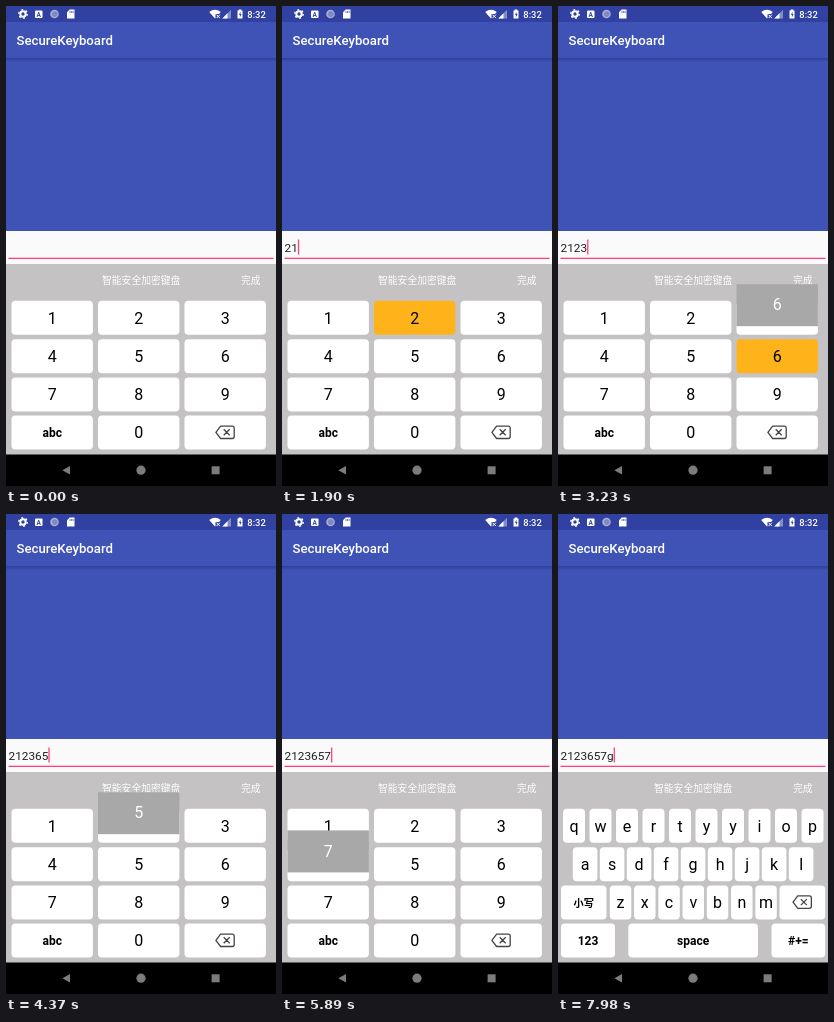
An HTML page that plays this animation: 270 px wide and 480 px high, repeating every 8000 ms.

```html
<!DOCTYPE html>
<html lang="zh">
<head>
<meta charset="utf-8">
<title>SecureKeyboard</title>
<style>
  html, body { margin: 0; width: 100%; height: 100%; overflow: hidden; background: #000; }
  svg { display: block; width: 100%; height: 100%; font-family: Roboto, sans-serif; }
  .key rect { fill: #fff; }
  .key.pressed rect { fill: #ffb31a; }
  .key text { font-size: 16px; text-anchor: middle; fill: #000; }
  .key .bold { font-size: 12px; font-weight: 700; }
  .key .cjk { font-size: 10.2px; }
  .cjk { font-family: "Noto Sans CJK SC", "Noto Sans CJK", sans-serif; }
  .bar { font-size: 9.8px; fill: #fff; }
  #popup text { font-size: 16px; text-anchor: middle; fill: #fff; }
</style>
</head>
<body>
<svg viewBox="0 0 270 480" xmlns="http://www.w3.org/2000/svg">
  <defs>
    <linearGradient id="shade" x2="0" y2="1">
      <stop stop-color="#2f3f98"/>
      <stop offset="1" stop-color="#3f53b6"/>
    </linearGradient>
  </defs>

  <rect width="270" height="226" fill="#3f53b6"/>
  <rect width="270" height="16" fill="#3041a2"/>
  <rect y="52" width="270" height="4" fill="url(#shade)"/>
  <text x="10.5" y="39.3" font-size="13.2" font-weight="500" fill="#fff">SecureKeyboard</text>

  <g fill="#fff">
    <circle cx="17" cy="8" r="2.7" fill="none" stroke="#fff" stroke-width="2"/>
    <circle cx="17" cy="8" r="4.2" fill="none" stroke="#fff" stroke-width="1.4" stroke-dasharray="1.8 2.6"/>
    <rect x="29" y="4.5" width="7.5" height="7.5" rx="1"/>
    <text x="32.75" y="10.6" font-size="6.5" font-weight="700" text-anchor="middle" fill="#3041a2">A</text>
    <circle cx="48.5" cy="8" r="4.3" fill="#a6aed6"/>
    <circle cx="48.8" cy="8.1" r="2.8" fill="#8089bd"/>
    <path d="M63.7 3.5H68.5V12.5H61V6.2Z"/>
    <path d="M64 5v2M65.6 5v2M67.1 5v2" stroke="#3041a2" stroke-width=".7"/>
    <path d="M203.2 6Q209 1.6 214.8 6L213 8H209.5V11.8L209 12.5Z"/>
    <path d="M210.5 8.7l3.4 3.4m0-3.4l-3.4 3.4" stroke="#fff"/>
    <path d="M225 3.8V12.5H216.3Z" opacity=".4"/>
    <path d="M221.5 7.3V12.5H216.3Z"/>
    <path d="M232.7 3.5h2.6v1h1.2v8h-5v-8h1.2Z"/>
    <path d="M234.5 5.7l-1.6 3h1v2.5l1.7-3.2h-1.1Z" fill="#3041a2"/>
    <text x="241.3" y="12" font-size="9.4" font-weight="500">8:32</text>
  </g>

  <rect y="225" width="270" height="34" fill="#fafafa"/>
  <rect x="2.5" y="251.7" width="265" height="1.3" fill="#ff4081"/>
  <text id="field" x="2.6" y="245.8" font-size="11.8" fill="#212121"></text>
  <rect id="cursor" y="233.5" width="1.3" height="15" fill="#ff4081"/>

  <rect y="258" width="270" height="191" fill="#c4c2c2"/>
  <text class="bar cjk" x="96" y="277.6">智能安全加密键盘</text>
  <text class="bar cjk" x="235" y="277.6">完成</text>
  <g id="digits"></g>
  <g id="letters"></g>
  <g id="popup">
    <rect height="42" fill="#a8a8a8"/>
    <text></text>
  </g>

  <rect y="448.5" width="270" height="31.5" fill="#000"/>
  <g fill="#7c7c7c">
    <path d="M56.3 464.2L64 459.9V468.5Z"/>
    <circle cx="135" cy="464.2" r="4.6"/>
    <rect x="205.6" y="460.3" width="8" height="8"/>
  </g>
</svg>

<script>
const LOOP = 8000, STEP = 190, BLINK = 500;
const ROWS = [294.8, 333.2, 371.4, 409.6], KEY_H = 34;
const $ = id => document.getElementById(id);
const keys = {};

function add(parent, tag, attrs, text = '') {
  const node = document.createElementNS('http://www.w3.org/2000/svg', tag);
  for (const name in attrs) node.setAttribute(name, attrs[name]);
  node.textContent = text;
  return parent.appendChild(node);
}

function addKey(board, label, x, row, w, style = '') {
  const y = ROWS[row], cx = x + w / 2, cy = y + KEY_H / 2;
  const node = add(board, 'g', { class: 'key' });
  add(node, 'rect', { x, y, width: w, height: KEY_H, rx: 4 });
  if (label === 'delete') {
    add(node, 'path', {
      d: 'M-9.3 0L-4.6 -6.2H7Q9 -6.2 9 -4.2V4.2Q9 6.2 7 6.2H-4.6ZM-1.5 -3L4.5 3M4.5 -3L-1.5 3',
      transform: `translate(${cx} ${cy - .3})`,
      fill: 'none', stroke: '#444', 'stroke-width': 1.3, 'stroke-linejoin': 'round'
    });
  } else {
    const baseline = cy + (style ? 4.1 : 5.8);
    add(node, 'text', { x: cx, y: baseline, class: style }, label);
  }
  keys[label] = { node, x, y, w };
}

function addRun(board, labels, x, row, w, pitch) {
  [...labels].forEach((label, i) => addKey(board, label, x + i * pitch, row, w));
}

const digits = $('digits'), letters = $('letters');
['123', '456', '789'].forEach((run, row) => addRun(digits, run, 5.5, row, 81.4, 86.5));
addKey(digits, 'abc', 5.5, 3, 81.4, 'bold');
addKey(digits, '0', 92, 3, 81.4);
addKey(digits, 'delete', 178.5, 3, 81.4);

addRun(letters, 'qwertyyiop', 5, 0, 22, 26.5);
addRun(letters, 'asdfghjkl', 14.8, 1, 24.6, 27);
addKey(letters, '小写', 3, 2, 45.5, 'bold cjk');
addRun(letters, 'zxcvbnm', 51.8, 2, 21.5, 24.25);
addKey(letters, 'delete', 221.5, 2, 45.7);
addKey(letters, '123', 3, 3, 54, 'bold');
addKey(letters, 'space', 70.3, 3, 129.7, 'bold');
addKey(letters, '#+=', 213.5, 3, 53.7, 'bold');

// Each press, in steps: key, touched, preview shown, released, preview hidden
const presses = [
  ['2', 1, 2, 3, 4], ['1', 5, 6, 8, 9], ['2', 10, 11, 12, 13],
  ['3', 13, 14, 15, 16], ['6', 16, 17, 18, 20], ['5', 20, 21, 22, 24],
  ['8', 25, 26, 27, 28], ['7', 28, 29, 30, 32], ['abc', 33, 35, 35, 35],
  ['g', 38, 39, 41, 42]
];
// Step, field text and, where it differs from the step, the blink start
const edits = [
  [1, ''], [3, '2'], [8, '21'], [12, '212'], [15, '2123'], [18, '21236'],
  [22, '212365'], [30, '2123657', 5515], [41, '2123657g']
];
const LETTERS_FROM = 35;

const show = (node, on) => node.setAttribute('visibility', on ? 'visible' : 'hidden');

function drawField(step, time) {
  const edit = edits.filter(([at]) => at <= step).pop();
  const [at, text, blinkFrom = at * STEP] = edit || [0, ''];
  $('field').textContent = text;
  $('cursor').setAttribute('x', 2.6 + (text ? $('field').getComputedTextLength() : 0));
  show($('cursor'), edit && Math.floor((time - blinkFrom) / BLINK) % 2 === 0);
}

function drawKeys(step) {
  const typing = step >= LETTERS_FROM;
  digits.style.display = typing ? 'none' : '';
  letters.style.display = typing ? '' : 'none';

  for (const label in keys) keys[label].node.classList.remove('pressed');
  const touched = presses.find(([, from, , to]) => step >= from && step < to);
  if (touched) keys[touched[0]].node.classList.add('pressed');

  const preview = presses.find(([, , from, , to]) => step >= from && step < to);
  show($('popup'), preview);
  if (!preview) return;
  const { x, y, w } = keys[preview[0]];
  const [box, label] = $('popup').children;
  box.setAttribute('x', x);
  box.setAttribute('y', y - 55);
  box.setAttribute('width', w);
  label.setAttribute('x', x + w / 2);
  label.setAttribute('y', y - 28.8);
  label.textContent = preview[0];
}

let start;
function draw(now) {
  start ??= now;
  const elapsed = (now - start) % LOOP;
  const step = Math.floor(elapsed / STEP);
  drawField(step, step * STEP);
  drawKeys(step);
  requestAnimationFrame(draw);
}
requestAnimationFrame(draw);
</script>
</body>
</html>
```
